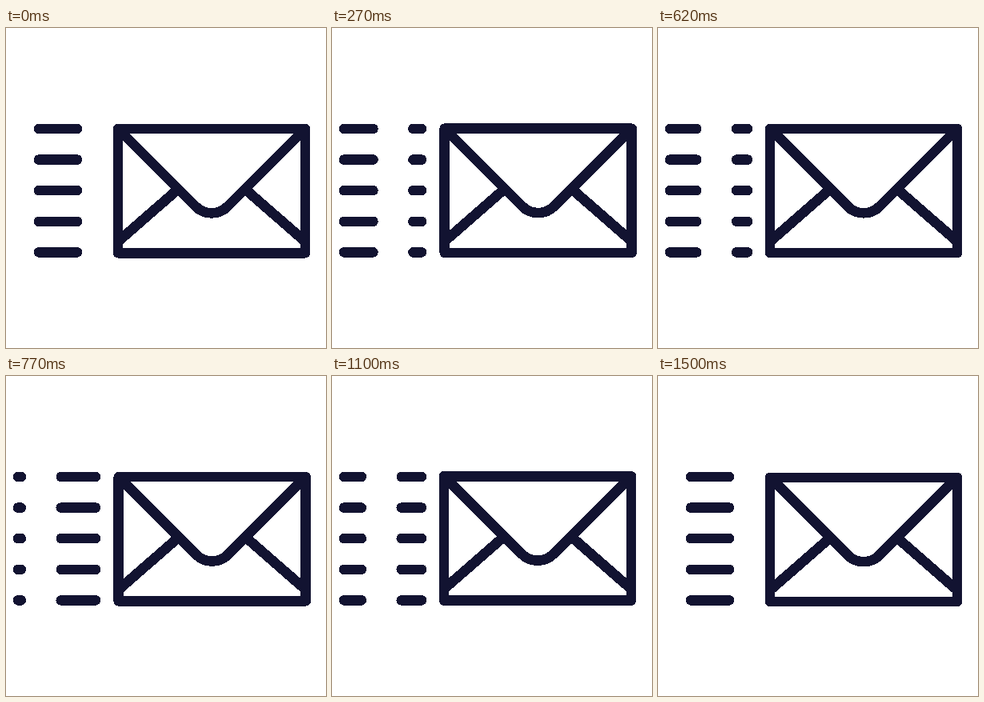
An HTML page for the animation above (1.52 s loop, 400 px wide and 400 px high).

```html
<!DOCTYPE html>
<html lang="en">
<head>
<meta charset="utf-8">
<title>Express mail</title>
<style>
  html, body { margin: 0; width: 100%; height: 100%; overflow: hidden; background: #fff; }
  svg { display: block; width: 100vw; height: 100vh; }
  path {
    fill: none; stroke: #121331; stroke-width: 12.6;
    stroke-linecap: round; stroke-linejoin: round; shape-rendering: crispEdges;
  }
  #trails { stroke-dasharray: 48 50; }
</style>
</head>
<body>
<svg viewBox="0 0 400 400">
  <g id="trails">
    <path d="M15 126H112"/>
    <path d="M15 164.6H112"/>
    <path d="M15 203.1H112"/>
    <path d="M15 241.8H112"/>
    <path d="M15 280.4H112"/>
  </g>
  <g id="envelope">
    <path d="M140 126H374V281.2H140Z"/>
    <path d="M140 126L237.2 223.2A28 28 0 0 0 276.8 223.2L374 126"/>
    <path d="M140 267L211 205M374 267L303 205"/>
  </g>
</svg>
<script>
  const LOOP = 1520, STEPS = 60, CYCLES = 13, PERIOD = 98, START = 72;
  const trails = document.getElementById('trails');
  const envelope = document.getElementById('envelope');

  // Envelope tremble: [step, dx, dy]
  const poses = [
    [0, 0, 0], [11, 0.7, -0.3], [19, -0.6, -0.3], [31, 0.7, 0.15],
    [44, 0, -0.7], [52, -1, 0], [60, 0, 0.8]
  ];

  // Steps last 20 and 30 ms in turn.
  const stepAt = t => 2 * Math.floor(t / 50) + (t % 50 >= 20 ? 1 : 0);

  function tremble(step) {
    const i = Math.max(1, poses.findIndex(p => p[0] >= step));
    const a = poses[i - 1], b = poses[i];
    const k = (step - a[0]) / (b[0] - a[0]);
    return [1, 2].map(j => a[j] + (b[j] - a[j]) * k);
  }

  function draw(now) {
    const step = Math.min(STEPS, stepAt(now % LOOP));
    const offset = (START + step * PERIOD * CYCLES / STEPS) % PERIOD;
    trails.style.strokeDashoffset = offset;
    envelope.setAttribute('transform', `translate(${tremble(step)})`);
  }

  const begin = performance.now();
  function tick() {
    draw(performance.now() - begin);
    requestAnimationFrame(tick);
  }
  tick();
</script>
</body>
</html>
```
